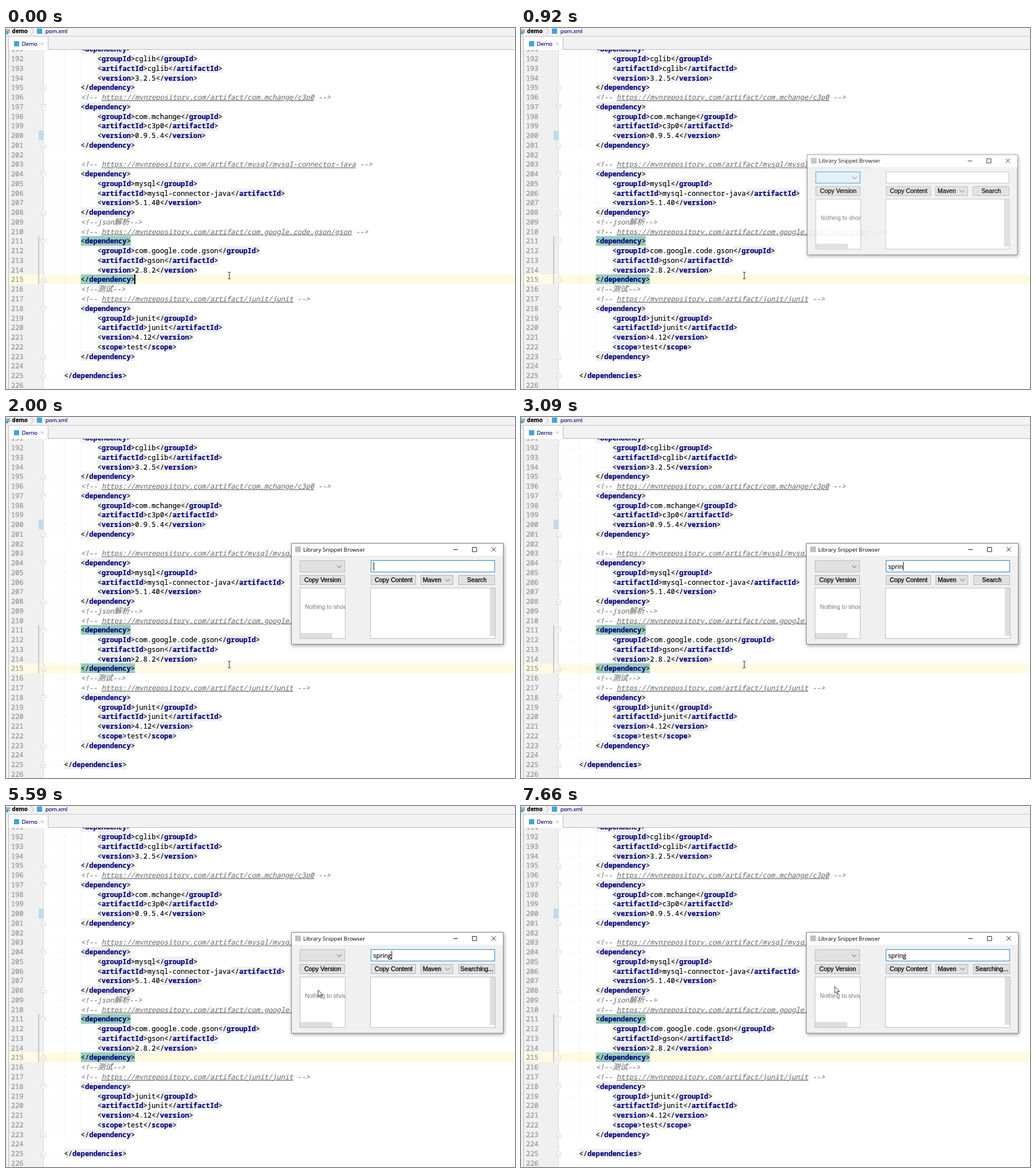
Animation of 889 by 630 pixels, one loop 8000 ms. Source, as an HTML page:

```html
<!DOCTYPE html>
<html lang="en">
<head>
<meta charset="utf-8">
<title>Dependency search</title>
<style>
  html, body { margin: 0; width: 100%; height: 100%; overflow: hidden; background: #fff; }
  svg { display: block; }
  text { white-space: pre; color: #000; fill: currentColor; stroke: currentColor; stroke-width: .2; }
  .code text { font: 12.13px "Noto Sans Mono", "DejaVu Sans Mono", monospace; }
  .code .tag { font-weight: bold; color: #000080; }
  .code .note { font-style: italic; color: #787878; }
  .code .num { color: #929292; }
  .link { text-decoration: underline; }
  .cjk { font-family: "Noto Sans CJK SC", "Noto Sans CJK", sans-serif; font-size: 13.4px; }
  .ui { font: 9.7px "Open Sans", "Noto Sans", sans-serif; }
  .navy { color: #000080; }
  .btn { font: 10.8px "Liberation Sans", Arial, sans-serif; stroke-width: .3; }
  .hint { font: 10.3px "Liberation Sans", Arial, sans-serif; color: #8c8c8c; }
  #win { filter: drop-shadow(1px 2px 3px rgba(0,0,0,.38)); }
</style>
</head>
<body>
<svg id="stage" width="889" height="630" viewBox="0 0 889 630"></svg>
<script>
const CW = 7.278, ROW = 16.76, X0 = 72.4, FIRST = 191;
const rowTop = n => 44.9 + ROW * (n - 192);
const col = c => X0 + CW * c;
const esc = s => s.replace(/</g, '&lt;').replace(/>/g, '&gt;');
const rect = (x, y, w, h, fill, more = '') =>
  `<rect x="${x}" y="${y}" width="${w}" height="${h}" fill="${fill}" ${more}/>`;
const rowRect = (x, n, w, fill, count = 1, more = '') => {
  const y = Math.round(rowTop(n));
  return rect(x, y, w, Math.round(rowTop(n + count)) - y, fill, more);
};
const box = (x, y, w, h, fill, line, id = '') =>
  rect(x + .5, y + .5, w - 1, h - 1, fill, `stroke="${line}" ${id && `id="${id}"`}`);
const path = (d, stroke, width = 1, fill = 'none') =>
  `<path d="${d}" stroke="${stroke}" stroke-width="${width}" fill="${fill}"/>`;
const text = (x, y, s, cls = '', more = '') =>
  `<text x="${x}" y="${y}" class="${cls}" ${more}>${s}</text>`;

const url = s => `    <!-- https://mvnrepository.com/artifact/${s} -->`;
const dep = (group, artifact, version, scope) => [
  '    <dependency>',
  ...Object.entries({ groupId: group, artifactId: artifact, version, scope })
    .filter(e => e[1]).map(([k, v]) => `        <${k}>${v}</${k}>`),
  '    </dependency>'];
const lines = [
  ...dep('cglib', 'cglib', '3.2.5'),
  url('com.mchange/c3p0'),
  ...dep('com.mchange', 'c3p0', '0.9.5.4'),
  '',
  url('mysql/mysql-connector-java'),
  ...dep('mysql', 'mysql-connector-java', '5.1.40'),
  '    <!--json解析-->',
  url('com.google.code.gson/gson'),
  ...dep('com.google.code.gson', 'gson', '2.8.2'),
  '    <!--测试-->',
  url('junit/junit'),
  ...dep('junit', 'junit', '4.12', 'test'),
  '', '</dependencies>', ''
].map(s => s && '    ' + s);

function codeRow(s, n) {
  const y = rowTop(n), base = y + 13.1;
  let out = text(8.7, base, n, 'num');
  const indent = s.search(/\S/);
  if (indent < 0) return out;
  for (let c = 0; c < indent; c++) out += rect(col(c) + 3, y + 9, 1, 1, '#d4d4d4');
  for (let c = 4; c < indent; c += 4) out += rect(col(c), y, .8, ROW, '#ececec');
  const body = s.slice(indent);
  if (body.startsWith('<!--')) {
    const marked = esc(body)
      .replace(/https\S+/, '<tspan class="link">$&</tspan>')
      .replace(/[\u4e00-\u9fff]+/, '<tspan class="cjk">$&</tspan>');
    return out + text(col(indent), base, marked, 'note');
  }
  const back = n === 211 || n === 215 ? '#99ccbb' : '#efefef';
  for (const m of s.matchAll(/(<\/?)(\w+)(>)|[^<>\s]+/g)) {
    const x = col(m.index);
    if (!m[2]) { out += text(x, base, m[0]); continue; }
    out += rowRect(x, n, CW * m[0].length, back)
      + text(x, base, esc(m[1]))
      + text(x + CW * m[1].length, base, m[2], 'tag')
      + text(x + CW * (m[0].length - 1), base, '&gt;');
  }
  return out;
}

function fold(s, n) {
  const open = s.trim() === '<dependency>';
  if (!open && !/<\/depend/.test(s)) return '';
  const y = rowTop(n) + 9, d = open ? 1 : -1;
  return path(`M61.5 ${y - 4 * d}h8.5v${5 * d}l-4.25 ${4 * d}l-4.25 ${-4 * d}z`, '#ccc', .9, '#fff')
    + path(`M63.7 ${y - .5 * d}h4.2`, '#bbb', .9);
}

function editor() {
  return rect(0, 38, 66, 592, '#f0f0f0')
    + rowRect(5, 215, 884, '#fffae3')
    + rect(65, 38, 1, 592, '#d9d9d9')
    + rowRect(57, 200, 9, '#c0dcee')
    + rowRect(56.6, 211, 1, '#999', 5)
    + lines.map((s, i) => codeRow(s, i + FIRST) + fold(s, i + FIRST)).join('')
    + rowRect(224, 215, 2, '#000', 1, 'id="editCaret"');
}

function header() {
  return rect(0, 0, 889, 38, '#f2f2f2')
    + rect(0, 14, 889, 1, '#c9c9c9') + rect(0, 37, 889, 1, '#b8b8b8')
    + rect(4, 15, 1, 615, '#b8b8b8') + rect(0, 15, 4, 615, '#f2f2f2')
    + rect(5, 16, 68, 22, '#fff') + rect(73, 16, 1, 22, '#b8b8b8')
    + rect(0, 2, 7, 7, '#a9b4bd') + rect(0, 6, 4, 5, '#3fa9dc')
    + text(10.5, 9, 'demo', 'ui', 'style="font-weight:bold"')
    + path('M44 0l4 5.5l-4 6', '#b5b5b5')
    + rect(54, 1, 9, 9, '#3ea6d8')
    + text(69, 9, 'pom.xml', 'ui navy', 'style="font-size:9.3px"')
    + rect(14, 23, 9, 9, '#3ea6d8')
    + text(27.5, 31.2, 'Demo', 'ui navy')
    + path('M60.5 24.5l5.5 5.5m0-5.5l-5.5 5.5', '#b0b0b0');
}

function dialog() {
  const button = (x, w) => box(x, 276, w, 17, '#e1e1e1', '#b5b5b5');
  const arrow = (x, y) => path(`M${x} ${y}l4 4l4-4`, '#555');
  return box(498, 220, 371, 177, '#f0f0f0', '#858585')
    + rect(499, 221, 369, 21, '#fff')
    + rect(505, 226, 10, 10, '#b9c3cb')
    + text(519, 234.7, 'Library Snippet Browser', 'ui', 'style="stroke:none"')
    + path('M781 231.5h8M814.5 227.5h7.5v7.5h-7.5zM848 227.3l7.5 7.5m0-7.5l-7.5 7.5', '#222')
    + box(513, 250, 79, 21, '#e1e1e1', '#adadad', 'combo') + arrow(578, 259)
    + box(637, 250, 217, 21, '#fff', '#ababab', 'field')
    + text(641.5, 265, '', 'ui', 'id="query" style="font-size:10.8px"')
    + rect(642, 253, 1, 15, '#000', 'id="caret"')
    + button(513, 79) + text(521, 287.8, 'Copy Version', 'btn')
    + button(637, 79) + text(644, 287.8, 'Copy Content', 'btn')
    + button(724, 57) + text(728, 288.2, 'Maven', 'btn') + arrow(767, 282.5)
    + button(790, 64) + text(822.3, 287.8, 'Search', 'btn', 'id="search" text-anchor="middle"')
    + box(513, 298, 80, 89, '#fff', '#bdbdbd')
    + '<clipPath id="list"><path d="M514 299h78v87h-78z"/></clipPath>'
    + text(522, 335, 'Nothing to show', 'hint', 'clip-path="url(#list)"')
    + rect(514, 377, 56, 9, '#dedede')
    + box(636, 298, 219, 89, '#fff', '#bdbdbd')
    + rect(845, 299, 9, 83, '#dedede');
}

const beam = path('M-2.5-6q2 0 2.5 1q.5-1 2.5-1M0-5v10M-2.5 6q2 0 2.5-1q.5 1 2.5 1', '#222', 1);
const pointer = path('M0 0v11.6l2.7-2.5l2 4.5l1.8-.8l-2-4.3h3.8z', '#222', .9, '#fff');
const stage = document.getElementById('stage');
stage.innerHTML = `<g class="code">${editor()}</g>${header()}<g id="win">${dialog()}</g>`
  + `<g id="beam">${beam}</g><g id="pointer">${pointer}</g>`;

const $ = id => document.getElementById(id);
const show = (id, on) => $(id).setAttribute('visibility', on ? 'inherit' : 'hidden');
const place = (id, x, y) => $(id).setAttribute('transform', `translate(${x} ${y})`);
const blinks = [2000, 2430, 2650, 3750, 4170, 4720, 5270, 5700, 6240, 6670, 7230, 7660];

function mouse(t) {
  if (t >= 5920) return [548, 315];
  if (t >= 5700) return [548, 316];
  const k = t < 4940 ? 0 : Math.min(7, Math.floor((t - 4940) / 108) + 1) / 7;
  const e = k * k * (3 - 2 * k);
  return [390 + 155 * e, 432 - 111 * e];
}

function draw(t) {
  show('editCaret', t < 250);

  const [scale, alpha] = t < 800 ? [1, 0] : t < 920 ? [.97, .48] : t < 1020 ? [.992, .9] : [1, 1];
  $('win').setAttribute('opacity', alpha);
  $('win').setAttribute('transform',
    `translate(683.5 308.5) scale(${scale}) translate(-683.5 -308.5)`);

  const typing = t >= 2000;
  $('combo').setAttribute('stroke', typing ? '#bcbcbc' : '#3c94d6');
  $('combo').setAttribute('fill', typing ? '#e1e1e1' : '#e3f0f9');
  $('field').setAttribute('stroke', typing ? '#2c86c9' : '#bdbdbd');

  const typed = Math.max(0, Math.min(6, Math.floor((t - 2650) / 110) + 1));
  $('query').textContent = 'spring'.slice(0, typed);
  $('caret').setAttribute('x', typed ? 641.5 + $('query').getComputedTextLength() + .3 : 642);
  show('caret', blinks.filter(b => b <= t).length % 2);
  $('search').textContent = t < 3850 ? 'Search' : 'Searching...';

  const [x, y] = mouse(t), overWin = x > 498;
  show('beam', !overWin);
  show('pointer', overWin);
  place(overWin ? 'pointer' : 'beam', x, y);
}

function frame() {
  draw(performance.now() % 8000);
  requestAnimationFrame(frame);
}
frame();
</script>
</body>
</html>
```
